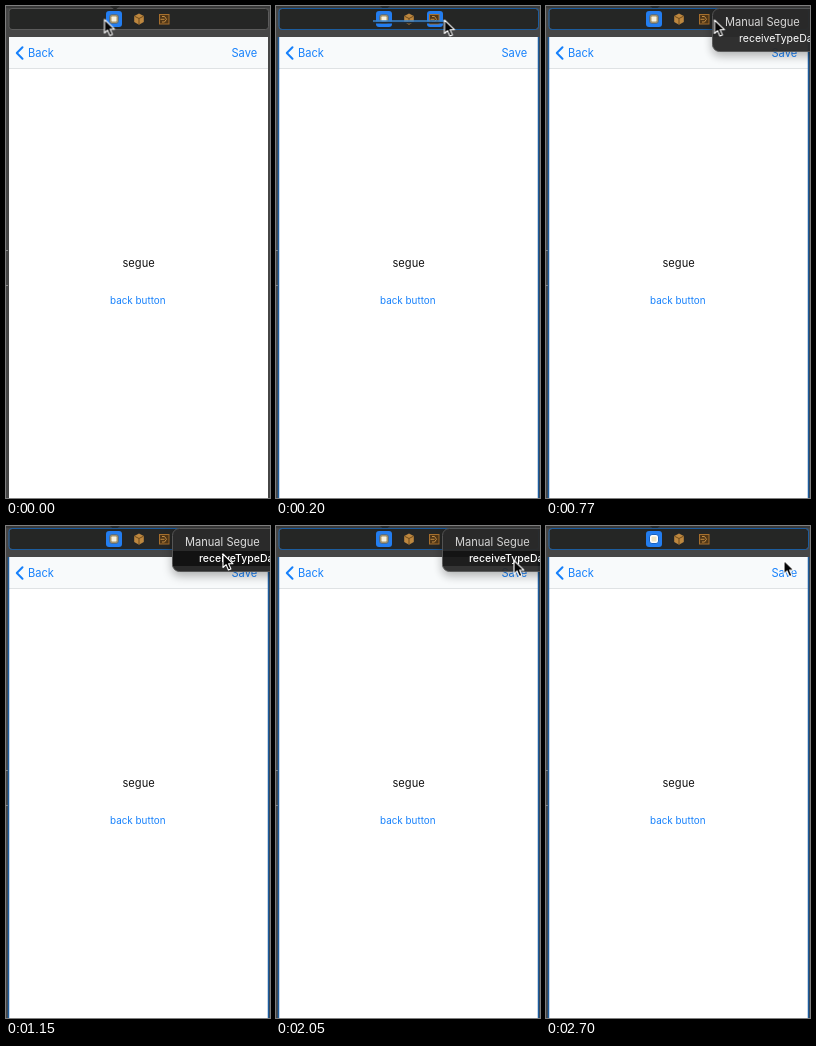
An HTML page that plays this animation: 264 px wide and 492 px high, repeating every 3600 ms.

```html
<!DOCTYPE html>
<html lang="en">
<head>
<meta charset="utf-8">
<title>Exit segue</title>
<style>
  html, body { margin: 0; width: 100%; height: 100%; overflow: hidden; background: #464646; }
  svg { display: block; width: 100vw; height: 100vh; }
  text { font-family: Inter, "Open Sans", sans-serif; font-size: 11.1px; }
  .link { fill: #1680fb; }
  .anim { animation: 3.6s step-end infinite; }

  .cursor { animation-name: move; }
  @keyframes move {
    0% { transform: translate(98.5px, 13.5px); }
    1.944% { transform: translate(112px, 14px); }
    2.778% { transform: translate(132px, 14px); }
    4.167% { transform: translate(154px, 14px); }
    5.556% { transform: translate(168.5px, 14px); }
    31.944% { transform: translate(217px, 28px); }
    33.333% { transform: translate(231px, 33px); }
    34.722%, 100% { transform: translate(238px, 34.5px); }
  }

  .selection { animation-name: select; }
  @keyframes select {
    0% { opacity: 0; }
    1.944%, 100% { opacity: 1; }
  }

  .wire { transform-origin: 97px 15px; animation-name: stretch; }
  @keyframes stretch {
    0% { transform: scaleX(0); }
    1.944% { transform: scaleX(.2); }
    2.778% { transform: scaleX(.48); }
    4.167% { transform: scaleX(.79); }
    5.556% { transform: scaleX(1); }
    21.389%, 100% { transform: scaleX(0); }
  }

  .drop { animation-name: drop; }
  @keyframes drop {
    0% { opacity: 0; }
    4.167% { opacity: 1; }
    21.389%, 100% { opacity: 0; }
  }

  .menu { animation-name: menu; }
  @keyframes menu {
    0% { opacity: 0; }
    21.389% { opacity: .97; }
    23.611% { opacity: 1; }
    56.944% { opacity: .95; }
    72.222% { opacity: .42; }
    73.611% { opacity: .18; }
    75%, 100% { opacity: 0; }
  }

  .row { animation-name: row; }
  @keyframes row {
    0% { opacity: 0; }
    31.944% { opacity: 1; }
    72.222%, 100% { opacity: 0; }
  }

  .action { animation-name: action; }
  @keyframes action {
    0% { font-weight: 400; }
    31.944% { font-weight: 500; }
    72.222%, 100% { font-weight: 400; }
  }

  .ring { animation-name: ring; }
  @keyframes ring {
    0% { fill: #a6946b; stroke: #4b6d91; }
    75%, 100% { fill: #fff; stroke: #1762c2; }
  }
  .core { animation-name: core; }
  @keyframes core {
    0% { fill: #f6f1df; }
    75%, 100% { fill: #eee4c4; }
  }
</style>
</head>
<body>
<svg viewBox="0 0 264 492" preserveAspectRatio="none">
  <defs>
    <filter id="shadow" x="-30%" y="-50%" width="160%" height="220%">
      <feDropShadow dx="0" dy="4" stdDeviation="5" flood-opacity=".3"/>
    </filter>
  </defs>

  <!-- Canvas and scene dock -->
  <rect width="264" height="492" fill="#464646"/>
  <rect width="264" height="2" fill="#393939"/>
  <rect x="3" y="2.5" width="259.500" height="21" rx="3" fill="#252625" stroke="#5b5b5b"/>
  <path d="M104 0h10l-5 4z" fill="#252625"/>
  <path d="M0 244.500h2M0 279.500h2" stroke="#8a8a8a"/>

  <!-- Phone scene -->
  <rect x="3" y="31" width="259" height="461" fill="#fff"/>
  <rect x="3" y="31" width="259" height="31" fill="#f8fafb"/>
  <path d="M3 62.500h259" stroke="#dfe2e4"/>
  <path d="M16.500 41.200L10.800 47l5.700 5.800" fill="none" stroke="#1680fb" stroke-width="2" stroke-linecap="round" stroke-linejoin="round"/>
  <text class="link" x="22" y="51">Back</text>
  <text class="link" x="225.500" y="51">Save</text>
  <text x="116.500" y="261" fill="#111">segue</text>
  <text class="link" x="104" y="298" style="font-size:9.900px">back button</text>

  <g class="anim selection" fill="none" stroke="#1c5c9e">
    <rect x="3" y="2.500" width="259.500" height="21" rx="3"/>
    <path d="M2.500 31v461M262.500 31v461" stroke-width="1.500"/>
  </g>

  <!-- Dock icons -->
  <g fill="#237df0">
    <rect x="100" y="5" width="16" height="16" rx="3"/>
    <rect class="anim drop" x="151" y="5" width="16" height="16" rx="3"/>
  </g>
  <rect class="anim ring" x="103.500" y="8.500" width="9" height="9" rx="2.500"/>
  <rect class="anim core" x="105.500" y="10.500" width="5" height="5" rx=".8"/>
  <path d="M133 7.500l4.800 2.500v6l-4.800 2.700-4.800-2.700v-6z" fill="#bd873f"/>
  <path d="M128.500 10.200l4.500 2.300 4.500-2.300M133 12.500v6" fill="none" stroke="#694718" stroke-width=".9"/>
  <rect x="153.500" y="8.500" width="9.500" height="9.500" fill="#503616" stroke="#a66f2d"/>
  <path d="M156 10.500h2.500l2 2.800-2 2.700H156M154.500 13.300h4" fill="none" stroke="#c28b43"/>

  <g class="anim wire">
    <path d="M97 16.500h72" stroke="#202a34" stroke-width="2"/>
    <path d="M97 15h72" stroke="#3a84cc" stroke-width="1.400"/>
  </g>

  <!-- Connection menu -->
  <g class="anim menu">
    <rect x="166.500" y="2.500" width="120" height="43" rx="7" fill="#292929" stroke="#555" filter="url(#shadow)"/>
    <rect class="anim row" x="167" y="25" width="119" height="15" fill="#121212"/>
    <text x="179" y="20" fill="#dedede">Manual Segue</text>
    <text class="anim action" x="193" y="36" fill="#fff" style="font-size:10.500px">receiveTypeData</text>
  </g>

  <path class="anim cursor" d="M0 0v13.500l3.100-2.900 2.300 5.400 2.500-1.100-2.300-5.200h4.300z" fill="#050505" stroke="#fff" stroke-width="1.100" stroke-linejoin="round"/>
</svg>
</body>
</html>
```
